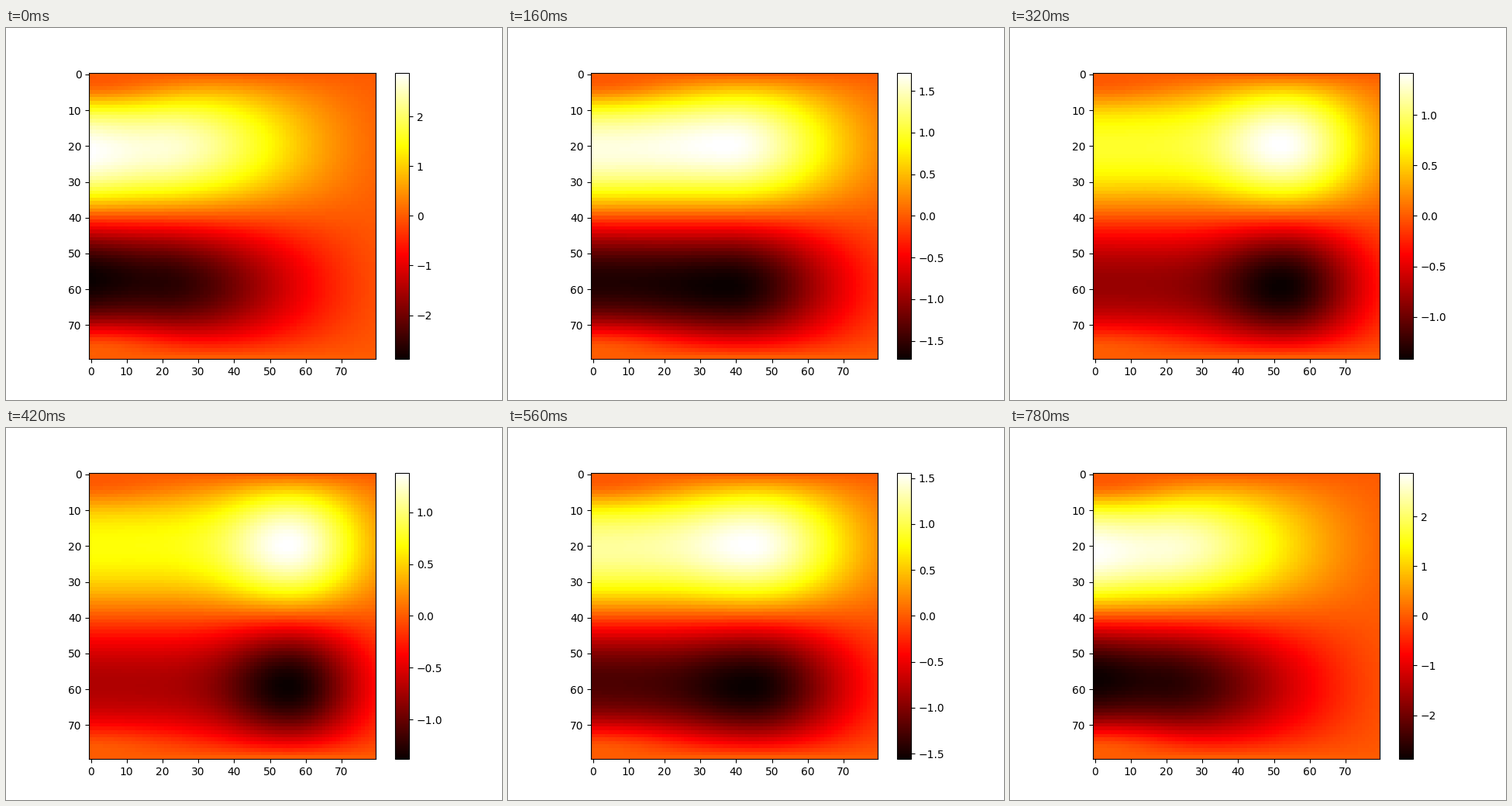
Recreate the animation shown at these times as a matplotlib script. Size 640x480 px, loop 0.8 s.

```python
import numpy as np
import matplotlib.pyplot as plt
from matplotlib.animation import FuncAnimation

N = 80
STEPS = 20
FRAMES = 2 * STEPS
KNOTS = [0, 5, 11, 18]


def curve(*values):
    return np.poly1d(np.polyfit(KNOTS, values, 3))


left_level = curve(2.883, 2.033, 1.25, 0.70)
peak_level = curve(2.66, 1.97, 1.559, 1.382)
peak_x = curve(18, 31, 43.5, 55)
front_width = curve(28.4, 24.4, 19.4, 14.7)
TAIL_WIDTH = 12.2

x = np.arange(N)
y = np.arange(N)
depth = np.minimum(y, N - 1 - y)
sign = np.where(y < N / 2, 1, -1)
theta = 2 * np.pi * depth / (N - 1)


def gauss(d, width):
    return np.exp(-d**2 / (2 * width**2))


def along(step):
    """Strength of the upper lobe from left to right."""
    peak, px = peak_level(step), peak_x(step)
    g0 = gauss(px, TAIL_WIDTH)
    base = (left_level(step) - peak * g0) / (1 - g0)
    tail = base + (peak - base) * gauss(x - px, TAIL_WIDTH)
    front = peak * gauss(x - px, front_width(step))
    edge = 1 - 0.5 * max(0, 1 - step / 9) * (x / (N - 1))**8
    return np.where(x < px, tail, front * edge)


def field(step):
    lobe = np.sin(theta)
    skew = 0.08 * (1 - step / 25)
    narrow = lobe - skew * np.sin(2 * theta)
    narrow *= 1 - 1.15 * np.exp(-(depth / 6.8)**2)
    narrow /= narrow.max()
    mix = np.exp(-(x / 25)**2)
    shape = np.outer(sign * narrow, mix) + np.outer(sign * lobe, 1 - mix)
    return shape * along(step)


fig, ax = plt.subplots(figsize=(6.4, 4.8), dpi=100)
image = ax.imshow(field(0), cmap="hot")
fig.colorbar(image, ax=ax)


def update(i):
    # forward, then back again
    data = field(min(i, FRAMES - 1 - i))
    top = np.abs(data).max()
    image.set_data(data)
    image.set_clim(-top, top)
    return [image]


anim = FuncAnimation(fig, update, frames=FRAMES, interval=20,
                     repeat=True, repeat_delay=0, blit=False)
plt.show()
```
